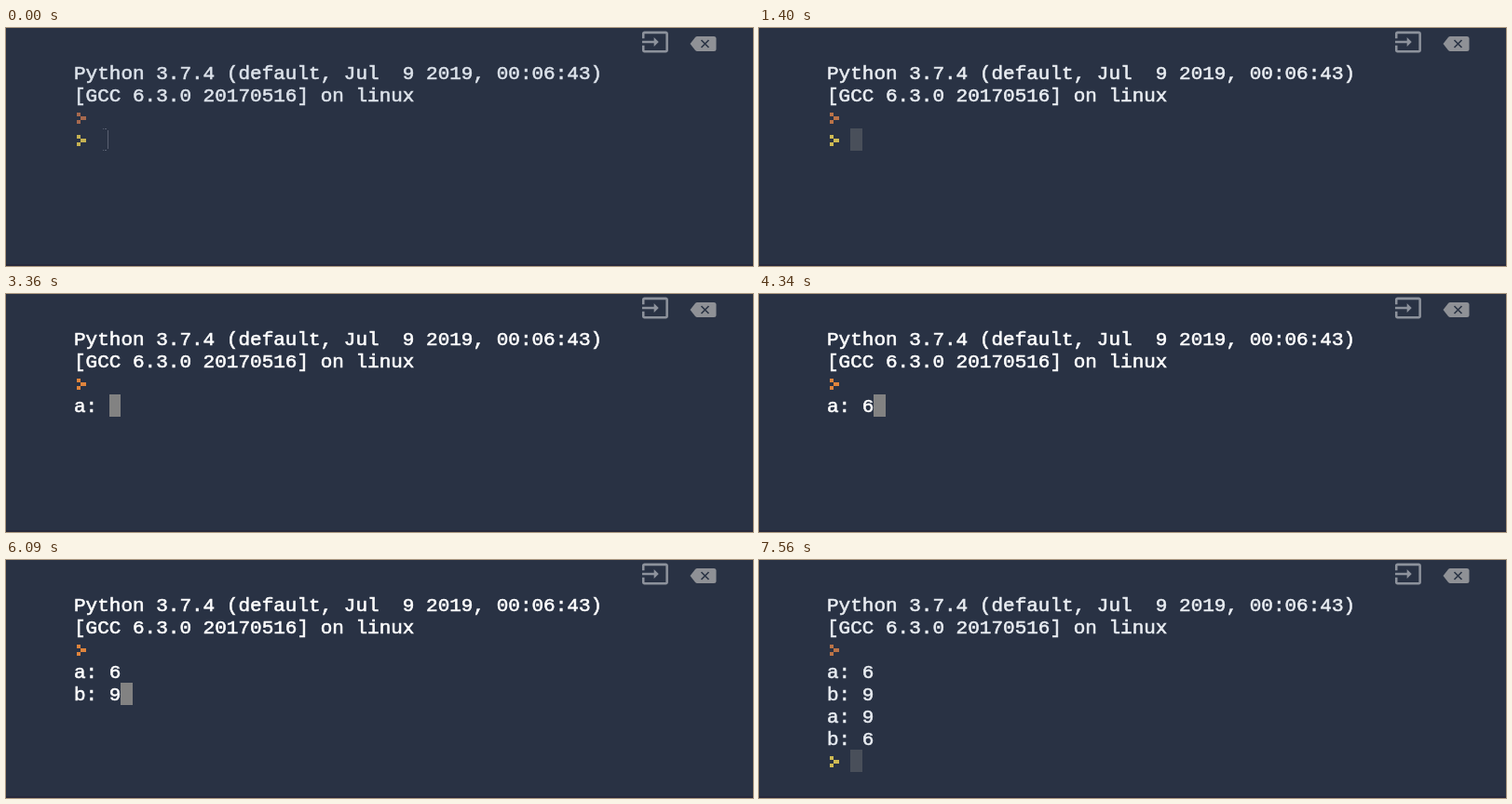
An HTML page with a canvas that plays this animation: 802x256 px, repeating every 7630 ms.

```html
<!DOCTYPE html>
<html lang="en">
<head>
<meta charset="utf-8">
<title>Python console</title>
<style>
  html, body { margin: 0; width: 100%; height: 100%; overflow: hidden; background: #293345; }
  canvas { display: block; width: 802px; height: 256px; }
</style>
</head>
<body>
<canvas id="stage" width="802" height="256"></canvas>
<script>
const ctx = document.getElementById('stage').getContext('2d');
const LOOP = 7630, STEP = 70;
const LEFT = 73, TOP = 36, COL = 12.6, ROW = 24;
const BG = [41, 50, 68];
const INK = [[221, 227, 235], [255, 255, 255]];
const ORANGE = [[166, 105, 78], [224, 132, 60]];
const YELLOW = [[198, 178, 82], [226, 204, 84]];
const BANNER = [
  'Python 3.7.4 (default, Jul  9 2019, 00:06:43)',
  '[GCC 6.3.0 20170516] on linux'
];

// Console states: start time, lines from row 3 on, cursor row and column.
// '>' stands for the drawn prompt mark.
const STATES = [
  [0, ['>'], 3, 2],
  [1960, ['a: '], 3, 3],
  [3780, ['a: 6'], 3, 4],
  [4760, ['a: 6'], 4, 0],
  [4830, ['a: 6', 'b: '], 4, 3],
  [5880, ['a: 6', 'b: 9'], 4, 4],
  [6440, ['a: 6', 'b: 9'], 5, 0],
  [6790, ['a: 6', 'b: 9', 'a: 9', 'b: 6'], 7, 0],
  [6860, ['a: 6', 'b: 9', 'a: 9', 'b: 6', '>'], 7, 2]
];

const INPUT_ICON = new Path2D('M21 3H3c-1.1 0-2 .9-2 2v4h2V5h18v14H3v-4H1v4' +
  'c0 1.1.9 2 2 2h18c1.1 0 2-.9 2-2V5c0-1.1-.9-2-2-2zM11 16l4-4-4-4v3H1v2h10v3z');
const CLEAR_ICON = new Path2D('M734.5 17L740 10Q741 9 742 9H760' +
  'Q762.5 9 762.5 11.5V22.5Q762.5 25 760 25H742Q741 25 740 24Z');
const CROSS = new Path2D('M746.5 13l8 8M754.5 13l-8 8');

const clamp = v => Math.max(0, Math.min(1, v));
const mix = (a, b, k) => `rgb(${a.map((v, i) => Math.round(v + (b[i] - v) * k))})`;

// 0 = console blurred, 1 = focused
function focusAt(t) {
  if (t < 1400) return 0;
  if (t < 7490) return clamp(0.36 + (t - 1400) / 240);
  return clamp(0.68 - (t - 7490) / 220);
}

// The thin outline gives the letters their medium weight.
function drawText(text, row, color) {
  const y = TOP + row * ROW + 19;
  ctx.fillStyle = ctx.strokeStyle = color;
  ctx.lineWidth = 0.6;
  ctx.fillText(text, LEFT, y);
  ctx.strokeText(text, LEFT, y);
}

function drawPrompt(row, color) {
  const y = TOP + row * ROW + 7;
  ctx.fillStyle = color;
  ctx.fillRect(76, y, 4, 4);
  ctx.fillRect(80, y + 4, 6, 4);
  ctx.fillRect(76, y + 8, 4, 4);
}

function drawCursor(row, col, focus, t) {
  const y = TOP + row * ROW;
  if (focus > 0) {
    const x = Math.round(LEFT + col * COL);
    const end = Math.round(LEFT + (col + 1) * COL);
    ctx.fillStyle = mix(BG, [130, 130, 130], focus);
    ctx.fillRect(x, y, end - x, ROW);
    return;
  }
  ctx.fillStyle = '#596071';
  if (t < 140) {
    ctx.fillRect(109, y + 2, 1, 20);
    for (const dy of [0, 23]) {
      ctx.fillRect(104, y + dy, 1, 1);
      ctx.fillRect(106, y + dy, 2, 1);
    }
  } else {
    for (let dy = 1; dy < ROW; dy += 4) ctx.fillRect(109, y + dy, 1, 3);
  }
}

function drawIcons() {
  ctx.save();
  ctx.translate(681.7, -0.2);
  ctx.scale(1.27, 1.27);
  ctx.fillStyle = '#8d929c';
  ctx.fill(INPUT_ICON);
  ctx.restore();

  ctx.fillStyle = '#8f9196';
  ctx.fill(CLEAR_ICON);
  ctx.strokeStyle = mix(BG, BG, 0);
  ctx.lineWidth = 1.6;
  ctx.stroke(CROSS);
}

function draw(t) {
  const focus = focusAt(t);
  const [, lines, row, col] = STATES.filter(s => s[0] <= t).pop();
  const ink = mix(...INK, focus);

  ctx.fillStyle = mix(BG, BG, 0);
  ctx.fillRect(0, 0, 802, 256);
  ctx.fillStyle = '#27293c';
  ctx.fillRect(0, 254, 802, 2);
  drawIcons();

  drawCursor(row, col, focus, t);
  drawPrompt(2, mix(...ORANGE, focus));
  ctx.font = '21px "Liberation Mono", "Courier New", monospace';
  BANNER.forEach((line, i) => drawText(line, i, ink));
  lines.forEach((line, i) => {
    if (line === '>') drawPrompt(i + 3, mix(...YELLOW, focus));
    else drawText(line, i + 3, ink);
  });
}

const start = performance.now();
function tick() {
  const t = Math.max(0, performance.now() - start) % LOOP;
  draw(Math.floor(t / STEP) * STEP);
  requestAnimationFrame(tick);
}
tick();
</script>
</body>
</html>
```
